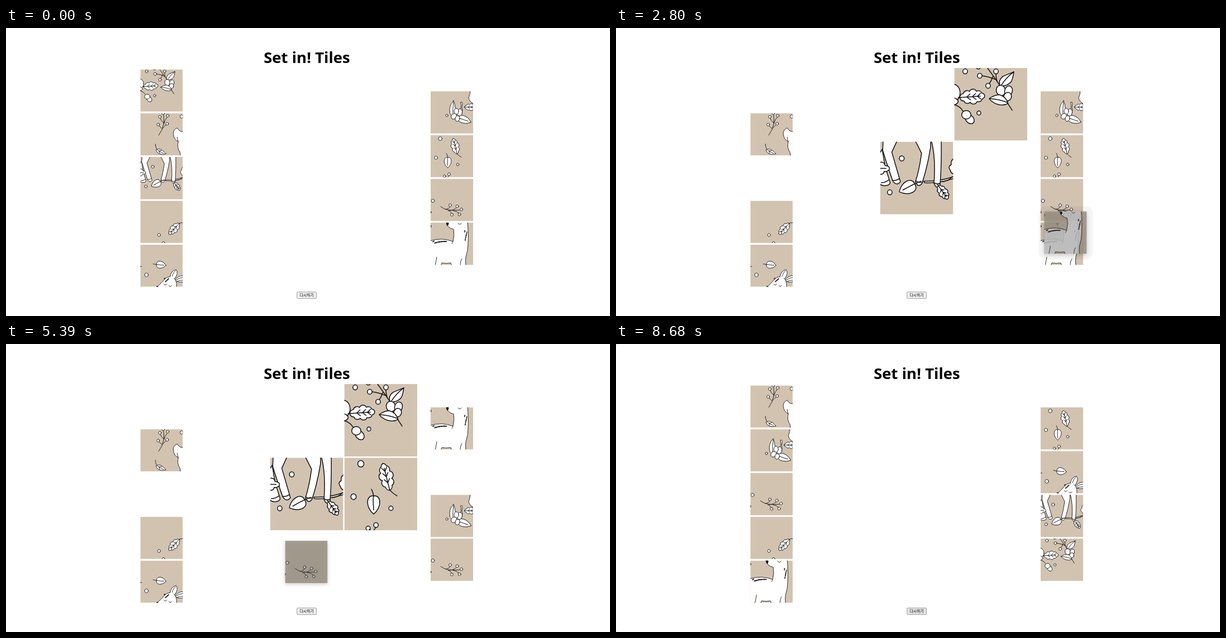
An HTML page for the animation above (8.82 s loop, 1081 by 518 pixels).

```html
<!DOCTYPE html>
<html>
<head>
<meta charset="utf-8">
<title>Tiles</title>
<style>
  html, body { margin: 0; width: 100%; height: 100%; overflow: hidden; background: #fff; }
  #stage { display: block; width: 100vw; height: 100vh; }
  .art { fill: #fff; stroke: #111; stroke-width: .87; stroke-linejoin: round; stroke-linecap: round; }
  .line { fill: none; }
  .ink { fill: #111; stroke: none; }
  .title { font: 600 27.5px "Noto Sans", "Open Sans", sans-serif; text-anchor: middle; }
  .label { font: 6.9px "Noto Sans CJK KR", "Noto Sans CJK", sans-serif; text-anchor: middle; }
  #ghostTile { filter: brightness(.74); opacity: .86; }
  #shadow { filter: blur(3.5px); }
</style>
</head>
<body>
<svg id="stage" viewBox="0 0 1081 518">
  <defs id="defs"></defs>
  <path d="M0 0H1.5L0 1.5ZM0 518H1.5L0 516.5Z" fill="#ccc"/>
  <text class="title" x="538.5" y="62.5">Set in! Tiles</text>
  <g id="tiles"></g>
  <rect id="button" x="520.8" y="474.8" width="34.8" height="11.8" rx="1.4" stroke="#767676" stroke-width=".7"/>
  <text class="label" x="538.2" y="482.7">다시하기</text>
  <g id="ghost">
    <rect id="halo" x="-10" y="-9.5" width="97" height="96" rx="13" fill="#000" opacity=".04"/>
    <rect id="shadow" y="2" width="76" height="76" fill="#000" opacity=".2"/>
    <use id="ghostTile" width="76" height="76"/>
  </g>
</svg>
<script>
const LOOP = 8820, STEP = 70, SIZE = 76, BIG = 130.5;
const $ = id => document.getElementById(id);

// Drawing helpers, in units of a 76 x 76 tile
const shape = d => `<path d="${d}"/>`;
const line = d => `<path class="line" d="${d}"/>`;
const berry = (x, y, r = 2.4) => `<ellipse cx="${x}" cy="${y}" rx="${r}" ry="${r * 1.07}"/>`;
const berries = (...list) => list.map(b => berry(...b)).join('');
const oval = (x, y, rx, ry, turn = 0) =>
  `<ellipse cx="${x}" cy="${y}" rx="${rx}" ry="${ry}" transform="rotate(${turn} ${x} ${y})"/>`;
const place = (x, y, turn, art) => `<g transform="translate(${x} ${y}) rotate(${turn})">${art}</g>`;

function leaf(x, y, turn, len, w, stem = 0) {
  const h = len / 2, b = w * .68;
  return place(x, y, turn,
    shape(`M${h} 0C${h * .3} ${-b} ${-h * 1.1} ${-b} ${-h} 0C${-h * 1.1} ${b} ${h * .3} ${b} ${h} 0`) +
    line(`M${-h - stem} 0Q${-h} 1 ${h * .55} 0`));
}

function oak(x, y, turn, len, w, stem = 0) {
  const h = len / 2, r = len * .15;
  const top = [[-.7, -.28], [-.2, -.4], [.35, -.38], [.78, -.22]];
  const rim = [...top, [1, 0], ...top.map(([a, b]) => [a, -b]).reverse(), [-1, 0]];
  const arcs = rim.map(([a, b]) => `A${r} ${r} 0 0 1 ${a * h} ${b * w}`).join('');
  const veins = [-.45, 0, .4].map(a =>
    `M${(a + .28) * h} ${-w * .22}L${a * h} 0L${(a + .28) * h} ${w * .22}`).join('');
  return place(x, y, turn, shape(`M${-h} 0${arcs}Z`) + line(`M${-h - stem} 0H${h * .65}${veins}`));
}

// Loose rows of fur spots; bend lifts the middle of the band
function spots(x, y, w, h, count, bend = 0) {
  let out = '';
  for (let i = 0; i < count; i++) {
    const u = (i * .618) % 1, v = (i * .377 + .2) % 1;
    out += `<circle class="ink" cx="${x + u * w}" cy="${y + v * h - bend * 4 * u * (1 - u)}" r=".95"/>`;
  }
  return out;
}

const art = {
  A: line('M34.6 0Q42 10 48 19M28 8Q36 9 43 12M43.5 5Q43 10 45 15M36 17Q39 13 40 9M26 0L28 -1') +
    berries([11.3, 3.5], [43.4, 3.5], [26.5, 8.1], [35.2, 18.6], [25.6, 47.1, 2], [25, -1.5]) +
    oval(-1, 26, 7, 9) + oval(-3, 35, 7, 4) + oak(18.8, 30, -4, 26, 14, 2) +
    shape('M62 4Q61 11 59.5 14Q56 19 48 19Q45 13 51 8.5Z') + line('M62 4Q54 10 49 18') +
    oval(48.5, 23.5, 4.8, 5.5, -15) + oval(56.5, 24, 4, 5.3, 15) + oval(55.5, 30, 4, 4.6, 20) +
    shape('M36.4 32Q42 28 47 28Q54 30 56 37Q51 40 45 38Q39 36 36.4 32Z') +
    line('M37 32Q48 33 55 36L60.3 44.2') +
    line('M0 38.4Q6 40 9 45') + oval(16, 53.5, 4, 5.5, -42) + oval(12.5, 49, 4.8, 4.4),

  B: line('M33 39.5Q40 30 42 19Q43 9 41 0M35 8Q37 13 42 18M49 6Q44 11 42 19M33 22Q36 25 39 28M47 20Q43 23 40 27') +
    berries([35, 6.5], [49, 4.5], [32, 20.5], [48, 19], [74, 6, 2.8], [41, 0]) +
    shape('M78 33Q70 34 66 26.5Q59 29 59 37Q60 48 68 51Q65 62 71 70L72 78H78Z') +
    line('M66 43Q66 48 68 51') +
    shape('M28 66Q35 60 46 73Q31 77 28 66') + line('M27 55.5Q27 64 33 68L41 72M33 68L38 67M34 69L34 72'),

  C: shape('M2 8L-2 14V43Q2 47 6 46Q11 45 10 42L5 26Z') +
    shape('M3 -2L2.5 9Q7 24 13 41Q17 47 21 42L12 11L18 -2Z') + line('M13 40.5Q17 41 20 38.5M1 43Q5 43 9 40') +
    shape('M-2 22Q4 20 5 25Q10 25 9.5 29Q7 32 4 31Q4 35 -2 34Z') + line('M0 28H6') +
    shape('M45.4 41.3Q62 42 78 36L78 38Q62 44 46 43Z') +
    shape('M36 -2L43 12Q41 28 36.7 42Q39.5 49 43.5 43.5Q49 27 52.4 6V-2Z') + line('M37 41Q40 43.5 44 42') +
    shape('M53 -2Q58 16 56 43.5Q59 51 62.3 45Q64 24 63.5 -2Z') + line('M56 43Q59 45 62.4 43.5') +
    shape('M78 17Q73 19 74 24Q70 26 73 30Q74 34 78 34Z') + line('M63 42Q70 42 75 37') +
    leaf(28, 48.5, 154, 18, 13, 7) + oak(65.5, 53, 54, 17, 9, 2) +
    berries([22.4, 17.5, 2.5], [9.9, 53]),

  D: oak(60.5, 50.5, 133, 27, 12) + line('M69.5 40.5Q73 39 77 39.5') + berries([33.5, 61.5, 2.5], [41.5, 76]),

  E: line('M0 39.5H2.5') + leaf(37.5, 36.5, 7, 17, 12.5, 6) + berry(11, 54.5, 3.2) +
    shape('M62 64Q68 55 78 56V67Q70 69 62 66Z') + line('M64 64Q69 60 77 59M66 66Q71 64 77 64') +
    shape('M29 77Q38 69 42 64Q47 57 56 58Q66 61 65 77Z') +
    shape('M53 58Q55 47 64 45Q69 51 62 61') + line('M57 57Q59 50 63 47') +
    spots(43, 60, 8, 7, 9) + line('M42 71Q45 75 47.5 71M51 74Q54 77 56 73.5') +
    '<circle class="ink" cx="30.5" cy="76" r="1.8"/>',

  F: shape('M71 -2Q71 5 68 12Q69 19 78 23V-2Z') +
    oak(72, 28.5, 0, 23, 11) +
    shape('M41 17Q32 26 34.5 39Q36 44 42 46Q47 32 41 17Z') + line('M41 19Q39 32 40 44') +
    shape('M54 20Q57 18 57 22Q55 29 57 36L52 39Q56 30 54 20Z') +
    leaf(61, 51.5, 20, 24, 13) +
    oval(52, 38, 4.5, 6.5, 10) + oval(46, 36, 4, 5.5) + oval(41.5, 45, 4.5, 5.5, 40) + oval(48, 49, 4, 5.2, 15) +
    berry(29, 43.5, 2),

  G: berries([17.2, 6.4, 3.2], [9.6, 40.8, 2.8], [48.6, 53, 2.2], [24.8, 74, 2.2]) +
    line('M33 72Q32 75 30 77M26 75L28 77') + berry(33, 70.5) +
    oak(43.8, 20, -104, 29, 12.5) + line('M47.5 34Q50 37 55 40') +
    leaf(30.6, 49.5, 90, 19, 12.5) + line('M30.6 41Q30 36 28.2 33'),

  H: line('M18 50Q28 59 54 56M27 55Q34 54 35 49M33 57Q42 57 47 51M31 57Q36 58 38 63M40 57Q47 58 51 62') +
    berries([4, 39.5, 2.8], [-1, 60, 2], [35, 47.5], [47.5, 49.5], [55, 55], [51.5, 64], [38, 64.5]),

  I: berry(-1.5, 6.5, 2.6) +
    shape('M28 -2Q29 10 41 12Q43 22 40 34Q20 26 -2 33V78H18L20 72.5Q28 74 36 72.5L38 78H63Q62 67 63 62Q67 50 67 38Q68 20 66 -2Z') +
    line('M11 62Q10 69 8 77M56 65Q53 69 53 77M40 34L38 38') +
    spots(4, 33.5, 25, 4, 26, 1.5) + spots(61, 13, 4, 19, 15) + line('M49 1Q52 5.5 55 1') +
    '<path class="ink" d="M28 -1H32Q33 4 30.5 6Q27.5 5 28 -1"/>',
};

$('defs').innerHTML = Object.entries(art).map(([id, d]) =>
  `<symbol id="${id}" viewBox="0 0 76 76"><rect width="76" height="76" fill="#d2c3b0"/><g class="art">${d}</g></symbol>`).join('');

// Slots: five on the left, four on the right, then the 3 x 3 board
const slots = [];
for (let i = 0; i < 5; i++) slots.push([240.4, 74.5 + i * 78.75, SIZE]);
for (let i = 0; i < 4; i++) slots.push([760, 113.8 + i * 78.75, SIZE]);
for (let i = 0; i < 9; i++) slots.push([340.5 + i % 3 * 132.5, 72 + Math.floor(i / 3) * 132.5, BIG]);

const layouts = [
  [0, 'ABCDEFGHI.........'],
  [1260, 'AB.DEFGHI....C....'],
  [2170, '.B.DEFGHI..A.C....'],
  [3080, '.B.DEFGIH..A.C....'],
  [3640, '.B.DEF.IH..A.CG...'],
  [4550, '.B.DEI.FH..A.CG...'],
  [5880, '.B.HEI.FD..A.CG...'],
  [6790, 'BDAGECIHF.........'],
  [7210, 'HFIBCAEDG.........'],
  [7560, 'BFHDIGECA.........'],
];

const NORMAL = '#efefef', HOVER = '#e3e3e3', PRESSED = '#f5f5f5';
const buttonFills = [
  [0, NORMAL], [6650, HOVER], [6720, PRESSED], [6790, HOVER], [7140, PRESSED],
  [7210, HOVER], [7490, PRESSED], [7560, HOVER], [8190, NORMAL], [8680, HOVER],
];

// Each drag: visible span, time of the last move, and the points passed on the way
const drags = [
  { piece: 'C', start: 840, rest: 1190, drop: 1260, path: [[244, 229], [340, 228], [460, 238], [556, 250]], halo: true },
  { piece: 'A', start: 1820, rest: 2030, drop: 2170, path: [[241.3, 72.5], [360, 82], [480, 100], [541, 112]], halo: true },
  { piece: 'I', start: 2800, rest: 3010, drop: 3080, path: [[766.5, 330], [777, 290], [782, 262], [783, 252]], halo: true },
  { piece: 'G', start: 3500, rest: 3570, drop: 3640, path: [[735, 202], [640, 230]], halo: true },
  { piece: 'F', start: 4200, rest: 4410, drop: 4550, path: [[757, 180], [754.7, 246], [756, 262], [757, 269]], halo: true },
  { piece: 'H', start: 5390, rest: 5740, drop: 5880, path: [[499.5, 354], [400, 346], [310, 338], [264, 334]], halo: false },
];

const latest = (table, t) => table.filter(row => row[0] <= t).pop()[1];

function along(path, k) {
  const pos = Math.min(Math.max(k, 0), 1) * (path.length - 1);
  const i = Math.min(Math.floor(pos), path.length - 2), f = pos - i;
  return [0, 1].map(n => path[i][n] + (path[i + 1][n] - path[i][n]) * f);
}

$('tiles').innerHTML = slots.map(([x, y, s]) => `<use x="${x}" y="${y}" width="${s}" height="${s}"/>`).join('');
const tiles = [...$('tiles').children];

function show(t) {
  const layout = latest(layouts, t);
  tiles.forEach((tile, i) => {
    tile.style.display = layout[i] === '.' ? 'none' : '';
    tile.setAttribute('href', '#' + layout[i]);
  });
  $('button').setAttribute('fill', latest(buttonFills, t));

  const drag = drags.find(d => t >= d.start && t < d.drop);
  $('ghost').style.display = drag ? '' : 'none';
  if (!drag) return;
  const [x, y] = along(drag.path, (t - drag.start) / (drag.rest - drag.start));
  $('ghost').setAttribute('transform', `translate(${x} ${y})`);
  $('ghostTile').setAttribute('href', '#' + drag.piece);
  $('halo').style.display = drag.halo ? '' : 'none';
}

const begin = performance.now();
let shown = -1;
function tick() {
  const t = Math.floor((performance.now() - begin) % LOOP / STEP) * STEP;
  if (t !== shown) show(shown = t);
  requestAnimationFrame(tick);
}
tick();
</script>
</body>
</html>
```
